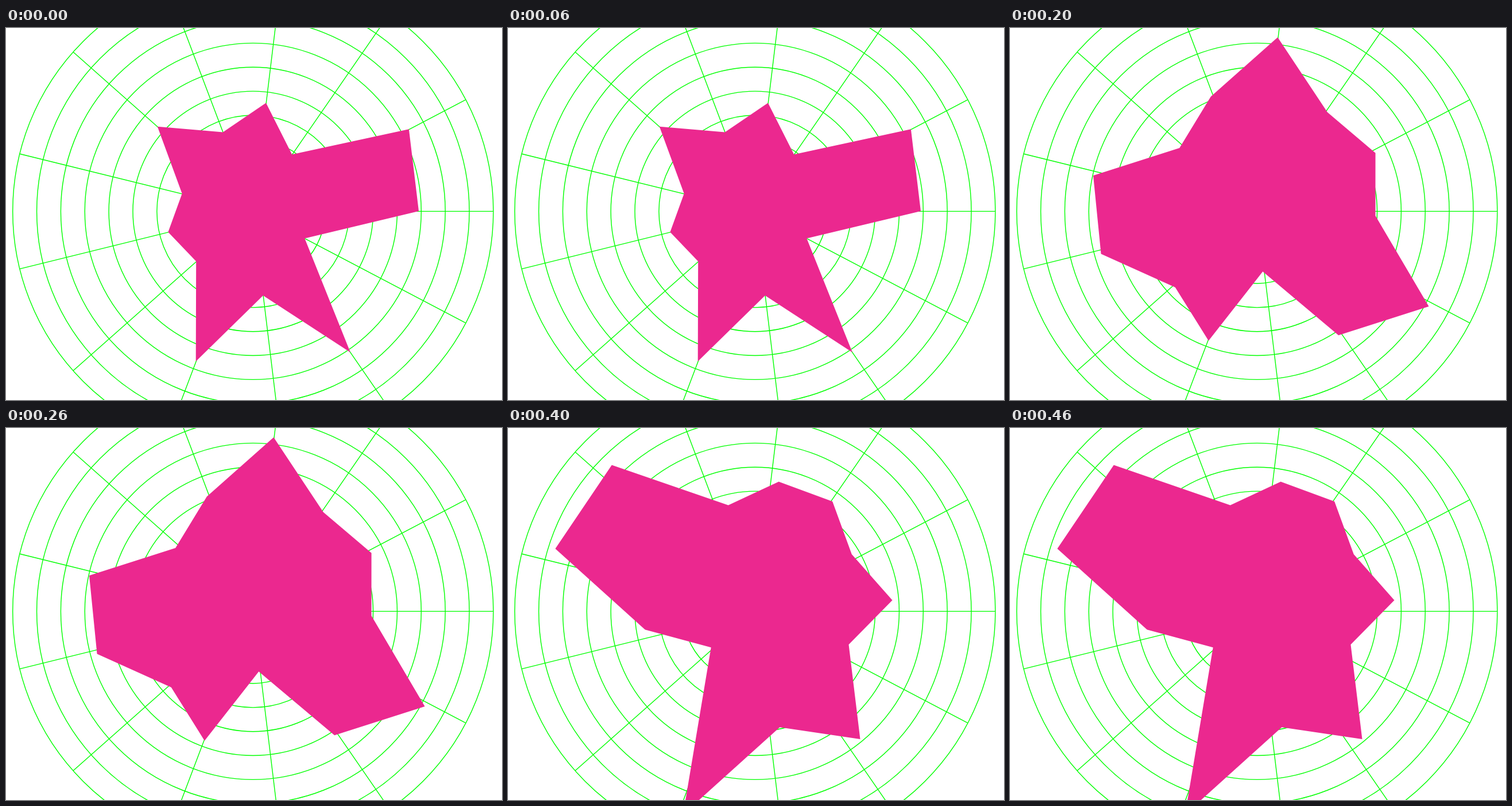
An HTML page with a canvas that plays this animation: 864x648 px, repeating every 500 ms.

```html
<!DOCTYPE html>
<html lang="en">
<head>
<meta charset="utf-8">
<title>Radar chart</title>
<style>
  html, body { margin: 0; width: 100%; height: 100%; overflow: hidden; background: #fff; }
  canvas { display: block; }
</style>
</head>
<body>
<canvas id="stage" width="864" height="648"></canvas>
<script>
const ctx = document.getElementById("stage").getContext("2d");
const HUB = [430.3, 319.4];
const RINGS = 10, RING_STEP = 41.86, SPOKES = 13;
const HOLD = 100;

// Each reading has one value per spoke; its hub wanders a little.
const readings = [
  { hub: [430, 319], values: [289, 102, 299, 148, 280, 132, 152, 127, 222, 147, 190, 120, 307] },
  { hub: [412.5, 321.5], values: [210, 166, 252, 223, 233, 190, 127, 180, 179, 292, 236, 179, 374] },
  { hub: [428.5, 327], values: [208, 340, 253, 98, 233, 188, 278, 292, 178, 222, 313, 219, 235] },
  { hub: [405.5, 323.5], values: [374, 164, 180, 223, 117, 209, 118, 124, 238, 147, 208, 332, 171] },
  { hub: [446.5, 300], values: [223, 166, 294, 223, 399, 124, 214, 375, 355, 177, 208, 209, 172] }
];

function spokePoint([x, y], spoke, radius) {
  const angle = 2 * Math.PI * spoke / SPOKES;
  return [x + radius * Math.cos(angle), y + radius * Math.sin(angle)];
}

function drawGrid() {
  ctx.beginPath();
  for (let ring = 1; ring <= RINGS; ring++) {
    const radius = ring * RING_STEP;
    ctx.moveTo(HUB[0] + radius, HUB[1]);
    ctx.arc(...HUB, radius, 0, 2 * Math.PI);
  }
  for (let spoke = 0; spoke < SPOKES; spoke++) {
    ctx.moveTo(...HUB);
    ctx.lineTo(...spokePoint(HUB, spoke, RINGS * RING_STEP));
  }
  ctx.strokeStyle = "#00ff00";
  ctx.lineWidth = 1.4;
  ctx.stroke();
}

function drawReading({ hub, values }) {
  ctx.beginPath();
  values.forEach((value, spoke) => ctx.lineTo(...spokePoint(hub, spoke, value)));
  ctx.closePath();
  ctx.fillStyle = "#eb288f";
  ctx.fill();
}

function render(time) {
  ctx.fillStyle = "#fff";
  ctx.fillRect(0, 0, 864, 648);
  drawGrid();
  drawReading(readings[Math.floor(time / HOLD) % readings.length]);
}

const start = performance.now();
function tick() {
  render(performance.now() - start);
  requestAnimationFrame(tick);
}
tick();
</script>
</body>
</html>
```
